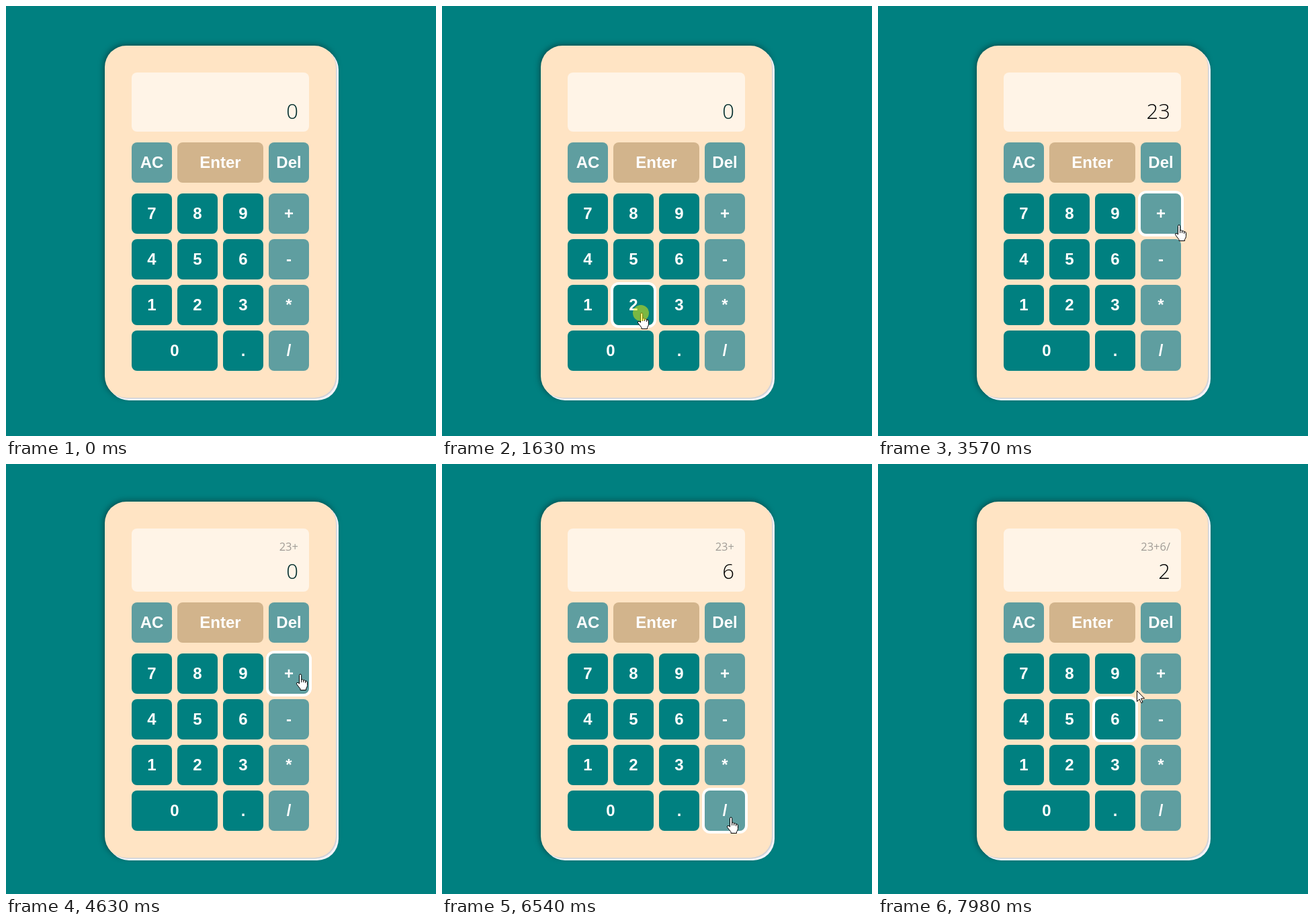
An HTML page that plays this animation: 640 px wide and 640 px high, repeating every 8000 ms.

```html
<!DOCTYPE html>
<html lang="en">
<head>
<meta charset="utf-8">
<title>Calculator</title>
<style>
  html, body { margin: 0; width: 100%; height: 100%; overflow: hidden; background: #008080; }
  svg { display: block; width: 100vw; height: 100vh; }
  .key { font: bold 24px "Liberation Sans", Arial, sans-serif; fill: #fff; text-anchor: middle; }
  .out { font-family: "Open Sans", "Noto Sans", sans-serif; text-anchor: end; }
</style>
</head>
<body>
<svg id="stage" viewBox="0 0 640 640">
  <defs>
    <filter id="soft" x="-10%" y="-10%" width="120%" height="120%"><feGaussianBlur stdDeviation="5"/></filter>
  </defs>
  <g id="shell"></g>
  <rect id="screen" x="187" width="264" rx="8" fill="#fff4e7"/>
  <text id="past" class="out" x="435" y="129" font-size="16.5" fill="#a09c96"></text>
  <text id="entry" class="out" x="435" font-size="31" font-weight="360"></text>
  <g id="pad">
    <rect id="ring" fill="none" stroke="#fff" stroke-width="4" rx="10"/>
  </g>
  <g id="cursor" stroke="#000" stroke-linejoin="round">
    <path id="arrow" fill="#fff" d="M.5 .5V16.5L4.2 13L6.7 18.6L9 17.6L6.6 12H11.6Z"/>
    <g id="hand">
      <path fill="#fff" d="M-1.5 14V1.5A1.6 1.6 0 0 1 1.7 1.5V8Q3.8 6.8 4.6 8.9Q7 8 7.7 10Q10.4 9.4 10.5 12V16.5Q10.5 19 8.5 21.5V23.5H0V21.5Q-3 18-5.5 14.5Q-6 12.5-4 12.3Q-2.8 12.5-1.5 14Z"/>
      <path fill="none" d="M1.7 8V12M4.7 9V12M7.7 10V13"/>
    </g>
  </g>
  <circle id="tap" r="12" fill="#fff500" fill-opacity=".48"/>
</svg>
<script>
const LOOP = 8000, PRESS_DELAY = 70, TAP_TIME = 145, HOVER_LAG = 25;
const TEAL = '#008080', CADET = '#5f9ea0', TAN = '#d2b48c';
const SIZE = 60, PITCH = 68;

const byId = id => document.getElementById(id);
const set = (el, attrs) => {
  for (const name in attrs) el.setAttribute(name, attrs[name]);
  return el;
};
const add = (parent, tag, attrs) =>
  parent.appendChild(set(document.createElementNS('http://www.w3.org/2000/svg', tag), attrs));
const show = (el, on) => el.setAttribute('visibility', on ? 'visible' : 'hidden');

// The case: soft shadow, white lip, grey edge, face.
const addLayer = (shift, fill, extra) => ({
  shift,
  rect: add(byId('shell'), 'rect', { x: 147 + shift, width: 344, rx: 32, fill, ...extra })
});
const layers = [
  addLayer(-1, 'rgba(0,0,0,.45)', { filter: 'url(#soft)' }),
  addLayer(4, '#f4f4f8'),
  addLayer(1.5, '#d2d2d8'),
  addLayer(0, '#ffe4c4')
];

const keys = {};
function addKey(label, col, y, fill, span = 1) {
  const x = 187 + col * PITCH, w = span * PITCH - 8;
  keys[label] = { x, y, w };
  add(byId('pad'), 'rect', { x, y, width: w, height: SIZE, rx: 8, fill });
  add(byId('pad'), 'text', { class: 'key', x: x + w / 2, y: y + 38 }).textContent = label;
}
addKey('AC', 0, 203, CADET);
addKey('Enter', 1, 203, TAN, 2);
addKey('Del', 3, 203, CADET);
['789+', '456-', '123*'].forEach((row, r) =>
  [...row].forEach((label, c) => addKey(label, c, 279 + r * PITCH, c < 3 ? TEAL : CADET)));
addKey('0', 0, 483, TEAL, 2);
addKey('.', 2, 483, TEAL);
addKey('/', 3, 483, CADET);

// The pointer's journey: each step leaves and arrives at a time, and may tap a key.
const steps = [];
const moveTo = (x, y, leave, arrive) => steps.push({ x, y, leave, arrive });
function visit(label, dx, dy, leave, arrive, tap) {
  const { x, y, w } = keys[label];
  steps.push({ label, x: x + w / 2 + dx, y: y + SIZE / 2 + dy, leave, arrive, tap });
}
moveTo(612, 613, 0, 20);
moveTo(597, 582, 20, 230);
visit('2', 12, 12, 670, 1470, 1630);
visit('3', -6, 6, 1780, 2060, 2590);
visit('+', 33, 26, 3080, 3430);
visit('+', 17, 4, 3430, 3760, 3970);
visit('6', 22, 7, 4630, 5170, 5400);
visit('/', 9, 13, 5550, 6040, 6640);
visit('2', 13, 10, 6790, 7250, 7330);
visit('6', 25, -20, 7490, 7880);
moveTo(385, 337, 7980, 7980);

function pointerAt(t) {
  const i = Math.max(0, steps.findLastIndex(s => s.leave <= t));
  const to = steps[i], from = steps[i - 1] || to;
  const u = t >= to.arrive ? 1 : Math.max(0, (t - to.leave) / (to.arrive - to.leave));
  const e = u * u * (3 - 2 * u);
  return { x: from.x + (to.x - from.x) * e, y: from.y + (to.y - from.y) * e };
}

const keyUnder = (p, drop) => Object.values(keys).find(k =>
  p.x >= k.x && p.x < k.x + k.w && p.y >= k.y + drop && p.y < k.y + drop + SIZE);

// Replays every key pressed so far.
function screenAt(t) {
  let past = '', entry = '0';
  for (const { label, tap } of steps) {
    if (!tap || tap + PRESS_DELAY > t) continue;
    if (/\d/.test(label)) entry = entry === '0' ? label : entry + label;
    else { past += entry + label; entry = '0'; }
  }
  return { past, entry };
}

function draw(t) {
  const { past, entry } = screenAt(t);
  const drop = past ? 3 : 0;

  for (const { rect, shift } of layers)
    set(rect, { y: 59 - drop + shift, height: 524 + 2 * drop });
  set(byId('screen'), { y: 99 - drop, height: 88 + 2 * drop });
  byId('past').textContent = past;
  byId('entry').textContent = entry;
  set(byId('entry'), { y: 168 + drop, fill: entry === '0' ? '#002c2c' : '#000' });
  set(byId('pad'), { transform: `translate(0 ${drop})` });

  const p = pointerAt(t), over = keyUnder(p, drop);
  const lit = keyUnder(pointerAt(t - HOVER_LAG), drop);
  show(byId('ring'), lit);
  if (lit) set(byId('ring'), { x: lit.x - 2, y: lit.y - 2, width: lit.w + 4, height: SIZE + 4 });

  const visible = t >= 20;
  set(byId('cursor'), { transform: `translate(${Math.round(p.x)} ${Math.round(p.y)})` });
  show(byId('arrow'), visible && !over);
  show(byId('hand'), visible && over);
  set(byId('tap'), { cx: p.x - 1, cy: p.y });
  show(byId('tap'), steps.some(({ tap }) => tap && t >= tap && t < tap + TAP_TIME));
}

const start = performance.now();
function tick() {
  draw((performance.now() - start) % LOOP);
  requestAnimationFrame(tick);
}
draw(0);
requestAnimationFrame(tick);
</script>
</body>
</html>
```
